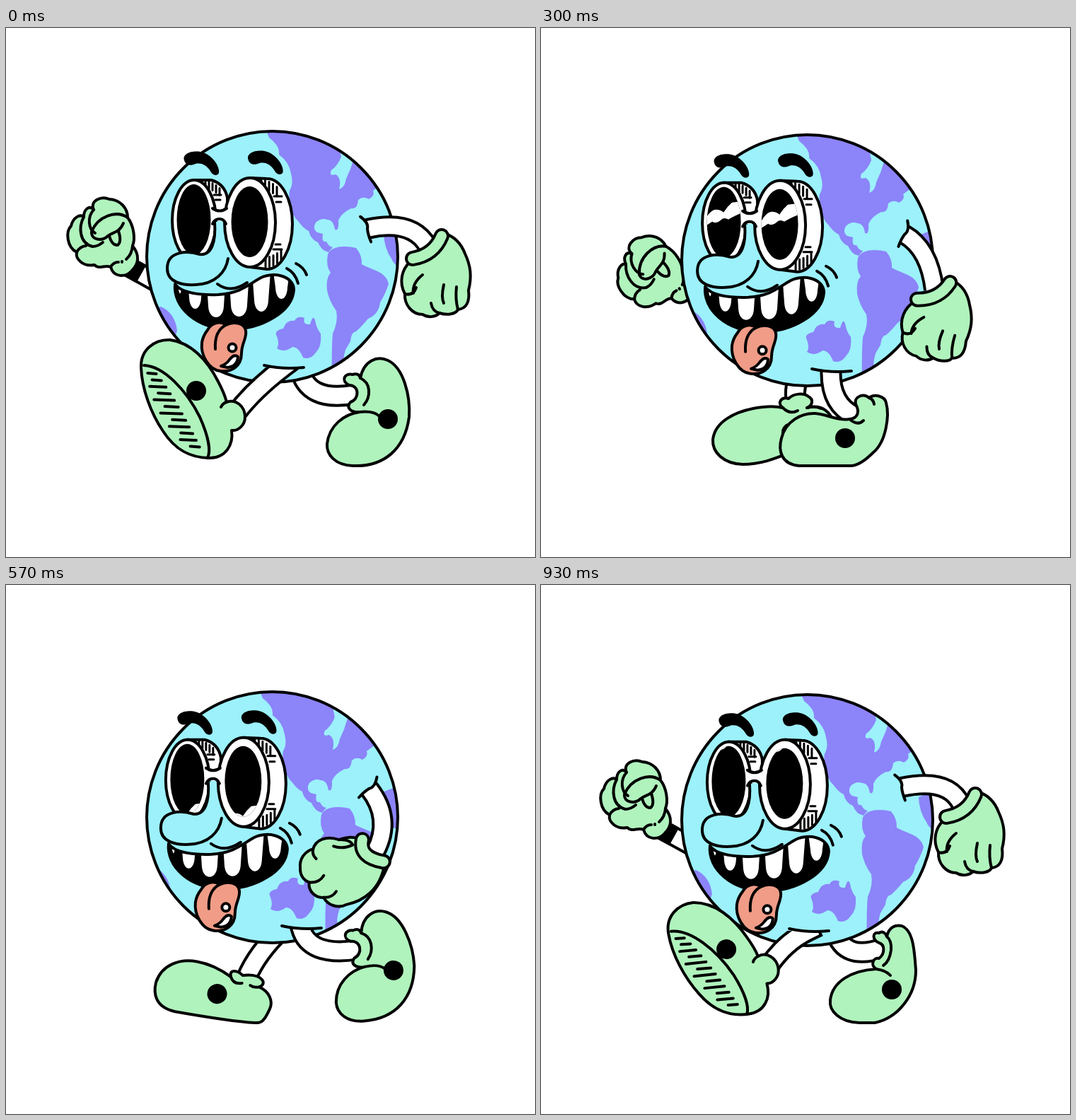
These frames come from a looping animation (748x748 px, 0.96 s). An HTML page with a canvas:

```html
<!DOCTYPE html>
<html lang="en">
<head>
<meta charset="utf-8">
<title>Walking globe</title>
<style>
html, body { margin: 0; width: 100%; height: 100%; overflow: hidden; background: #fff; }
canvas { display: block; width: 748px; height: 748px; }
</style>
</head>
<body>
<canvas id="stage" width="748" height="748"></canvas>
<script>
const ctx = document.getElementById('stage').getContext('2d');
const LOOP = 960, STEP = 30, TAU = Math.PI * 2;
const SEA = '#9cf1fb', LAND = '#8c84f9', GREEN = '#b0f3bd', SKIN = '#f09c87', INK = '#000', WHITE = '#fff';
const CX = 376.5, CY = 323.5, R = 177.5;
const path = d => new Path2D(d);

const land = path(`M366 140 L372 155 Q388 167 386 179 Q401 190 403 206 Q407 220 401 230 Q399 240 404 250
  Q404 265 413 273 Q421 284 428 287 Q431 299 441 303 Q446 315 456 317 L462 310 Q456 309 453 302 Q446 304 448 291
  L440 289 Q433 284 438 275 Q446 268 454 271 Q463 271 465 285 Q471 288 470 272 Q474 262 488 255 Q497 257 498 243
  Q505 237 513 242 Q522 237 519 230 L530 222 L560 150 Z`);
const southLand = path(`M455 320 C460 308 479 307 495 311 Q504 322 503 334 C516 342 538 344 541 362
  Q536 377 529 388 Q527 405 512 411 Q502 423 495 429 Q488 430 487 443 L480 455 Q476 468 478 476 L474 500 L461 500
  Q460 455 462 432 Q470 415 467 400 Q457 386 454 371 Q452 354 459 346 Q452 337 455 320Z`);
const island = path(`M383 436 Q378 428 392 425 Q397 412 408 414 Q412 406 422 410 Q419 420 430 419 Q434 404 437 413
  Q439 425 445 432 Q447 450 438 459 Q430 470 420 466 Q414 451 405 451 Q393 460 383 453 Q387 447 383 436Z`);
const rims = path('M534 291 Q546 286 562 280 V340 Q549 337 545 326 Q535 312 534 291Z M219 394 Q239 403 242 428 L236 446 L195 400Z');
const bay = path('M466 140 L474 182 Q469 195 460 201 Q456 210 466 207 Q475 212 471 228 Q479 226 481 213 Q488 199 492 184 L500 140Z');

const brow = path('M252 187 C249 178 262 173 275 175 C291 178 303 196 301 205 C299 210 292 208 290 204 C285 195 277 190 268 192 C262 195 254 195 252 187Z');
const nose = path('M295 274 C297 302 291 322 274 320 C258 315 228 314 228 340 C228 360 250 364 268 363 C296 362 311 345 314 326');
const noseFill = path('M295 274 C297 302 291 322 274 320 C258 315 228 314 228 340 C228 360 250 364 268 363 C296 362 311 345 314 326 L309 274Z');
const mouth = path('M239 362 C247 374 272 378 300 377 C330 375 342 364 357 355 C376 343 407 350 407 370 C405 401 362 426 318 426 C268 425 236 394 239 362Z');
const tongue = path('M285 427 C291 416 304 414 311 420 C321 415 337 416 339 428 C341 438 333 446 333 460 C333 479 318 487 303 485 C286 483 275 462 277 445 C278 438 281 432 285 427Z');
const glint = path('M-30 18 Q-20 -4 -11 -4 Q-4 -4 0 0 Q5 -8 12 -14 L30 -16 V-1 Q15 5 7 10 Q0 6 -4 11 Q-10 17 -16 13 L-30 22Z');

// Foot drawings: ankle pivot, outline, inner lines, badge centre.
const soleLines = () => {
  let d = 'M195 477 C223 478 255 512 274 550 C286 577 290 598 285 608';
  for (let i = 0; i < 12; i++) {
    const y = 488 + 9.4 * i, u = (y - 480) / 110;
    const left = 191 + 54 * u * u, right = 209 + 69 * u ** 0.8;
    d += ` M${i % 2 ? (left + right) / 2 - 2 : left + 9} ${y} L${right - 5} ${y + 1}`;
  }
  return d;
};
const makeFoot = (px, py, outline, lines, bx, by) => ({ px, py, outline: path(outline), lines: path(lines), bx, by });
const FEET = {
  sole: makeFoot(325, 545, 'M191 480 C190 455 210 440 232 441 C262 445 285 470 300 500 C308 515 311 525 312 529 C325 524 338 535 338 550 C338 562 328 570 319 569 C322 590 310 608 288 608 C262 608 240 598 222 570 C205 545 192 510 191 480Z',
    soleLines() + ' M312 529 Q306 531 304 536', 269, 513),
  flat: makeFoot(383, 555, 'M292 619 C262 618 257 598 258 583 C262 556 286 544 310 544 C330 544 345 549 361 557 C356 546 369 546 377 552 C405 544 414 558 403 564 C418 568 426 580 423 592 C418 612 414 614 406 615 C380 618 340 619 292 619Z',
    'M361 557 Q366 567 378 563 M403 564 Q396 567 390 564', 346, 584),
  bent: makeFoot(443, 548, 'M365 619 C340 617 335 598 340 580 C346 556 368 544 388 545 C404 546 420 556 436 553 C448 552 451 543 445 532 C442 521 456 516 464 523 C471 517 486 520 488 530 C493 548 488 585 470 600 C458 612 448 619 438 619Z',
    'M436 553 Q448 563 456 555 M464 523 Q470 525 471 532', 430, 580),
  push: makeFoot(482, 514, 'M450 619 C422 618 407 602 409 587 C412 560 440 545 474 543 C465 537 470 526 478 528 C487 521 486 508 478 506 C468 501 468 490 478 492 C484 488 488 494 489 497 C492 483 502 480 510 482 C526 488 528 515 530 545 C530 580 505 612 472 619Z',
    'M474 543 Q488 545 494 552 M489 497 Q496 503 495 516 Q493 532 484 538', 496, 572),
  tiptoe: makeFoot(492, 518, 'M500 543 C488 544 480 537 487 529 C500 525 500 505 485 505 C472 498 480 487 490 490 C496 488 500 490 501 495 C506 470 525 463 540 470 C562 480 572 520 570 550 C564 595 535 621 490 619 C466 618 453 604 454 588 C457 562 478 546 500 543Z',
    'M500 543 Q520 541 528 549 M501 495 Q512 500 513 512 Q514 524 506 533', 540, 553),
  trail: makeFoot(492, 514, 'M545 619 C524 618 517 600 521 582 C525 562 538 553 549 549 C530 556 512 547 503 535 C492 538 482 535 485 529 C498 526 498 506 485 500 C479 490 491 486 501 490 C502 476 511 470 522 471 C550 473 585 490 600 505 C616 521 614 560 607 585 C600 605 592 618 580 619Z',
    'M549 549 Q555 546 556 542 M501 490 Q507 493 508 498', 571, 528),
  swing: makeFoot(360, 525, 'M285 617 C258 616 242 600 243 582 C246 556 275 543 300 538 C315 535 330 534 342 537 C333 530 340 521 350 524 C358 516 372 516 378 521 C386 525 384 534 376 537 C398 531 412 545 413 560 C412 578 400 586 385 589 C350 598 325 617 285 617Z',
    'M342 537 Q352 547 363 541 M376 537 Q388 534 396 538', 354, 572)
};
// Walk poses: drawing, ankle x, y, turn, hip x, knee x, y.
const WALK = [
  ['sole', 325, 545, 0, 392, 350, 512], ['flat', 340, 556, 10, 392, 355, 520],
  ['flat', 360, 556, 2, 390, 365, 520], ['flat', 383, 555, 0, 391, 377, 520],
  ['flat', 412, 553, -2, 400, 395, 525], ['bent', 443, 548, 0, 410, 409, 532],
  ['bent', 465, 537, -6, 413, 420, 530], ['push', 482, 514, 0, 416, 428, 532],
  ['tiptoe', 492, 518, 0, 415, 425, 530], ['tiptoe', 496, 516, -7, 417, 428, 526],
  ['trail', 484, 514, 0, 418, 429, 523], ['trail', 492, 514, 0, 418, 430, 520],
  ['swing', 425, 518, -14, 395, 425, 500], ['swing', 360, 525, 0, 371, 357, 500],
  ['swing', 338, 533, 12, 373, 345, 500], ['sole', 322, 539, -8, 378, 345, 505]
];
const BOB = [0, 5, 8, 10, 2, 5, 8, 9];

// Near arm: time, shoulder, elbow, wrist, turn.
const NEAR_ARM = [
  [0, 511, 284, 574, 270, 596, 308, 0], [180, 509, 298, 560, 296, 592, 325, -15],
  [300, 514, 292, 549, 312, 556, 370, 11], [390, 513, 288, 553, 315, 546, 374, 55],
  [480, 511, 284, 546, 320, 525, 370, 60], [690, 517, 294, 552, 340, 532, 387, 54],
  [750, 517, 291, 566, 320, 574, 386, 50], [810, 517, 290, 580, 303, 602, 372, 42],
  [930, 510, 286, 576, 272, 594, 310, 0]
];
// Far arm: time, fist centre, turn.
const FAR_ARM = [
  [0, 130, 295, 0], [90, 118, 283, 5], [180, 133, 288, 0], [300, 150, 351, -25], [360, 190, 425, -55],
  [420, 275, 435, -85], [480, 340, 400, -100], [600, 335, 405, -100], [690, 255, 456, -75],
  [750, 195, 430, -60], [810, 143, 363, -33], [930, 127, 303, 0]
];
const openHand = path('M572 330 C561 340 556 358 565 375 C564 390 575 404 590 404 C598 409 608 408 614 402 C625 406 638 403 640 397 C652 396 657 386 655 370 C660 350 658 335 650 318 C643 300 632 293 622 290Z');
const openLines = path('M565 375 Q577 378 581 366 M590 348 Q575 360 577 374 M614 402 Q604 400 602 388 M620 362 Q616 380 620 388 M640 397 Q636 382 638 365');
const curlHand = path('M502 352 C492 346 480 350 474 352 C455 345 441 352 437 364 C425 367 417 378 418 390 C417 402 424 409 430 411 C428 425 440 434 450 433 C455 444 470 450 482 444 C505 440 530 425 537 390Z');
const curlLines = path('M437 364 Q435 373 441 378 M474 352 Q490 352 493 360 Q478 366 466 361 M430 411 Q444 413 451 402 M450 433 Q462 434 468 425');
const fist = path('M124 257 C118 244 135 237 146 242 C162 243 172 255 172 268 C181 280 183 298 179 308 C190 322 187 334 178 343 C168 354 152 352 148 338 C140 334 132 342 125 335 C108 338 98 326 100 317 C86 310 84 288 92 280 C95 267 105 263 110 267 C110 256 118 250 124 257Z');
const fistLines = path('M110 267 C102 282 104 304 122 309 Q130 309 137 303 M124 257 C114 268 117 285 126 290 M172 268 C156 257 130 266 121 288 C120 300 136 302 144 294 C152 288 160 290 166 276 M146 294 Q150 308 158 307 Q164 302 159 287 M100 317 Q104 309 113 308 M148 338 Q152 331 159 331 M164 330 v1 M170 327 Q178 320 179 308');

function paint(shape, fill) {
  if (fill) { ctx.fillStyle = fill; ctx.fill(shape); }
  ctx.stroke(shape);
}
function disc(x, y, rx, ry, fill, outlined) {
  ctx.beginPath();
  ctx.ellipse(x, y, rx, ry, 0, 0, TAU);
  ctx.fillStyle = fill;
  ctx.fill();
  if (outlined) ctx.stroke();
}
function scoped(draw) { ctx.save(); draw(); ctx.restore(); }
function placed(x, y, turn, px, py, draw) {
  scoped(() => {
    ctx.translate(x, y);
    ctx.rotate(turn * Math.PI / 180);
    ctx.translate(-px, -py);
    draw();
  });
}
function tube(d, width, color, cap = 'butt') {
  const shape = path(d);
  scoped(() => {
    ctx.lineCap = cap;
    for (const [w, c] of [[width, INK], [width - 8, color]]) {
      ctx.lineWidth = w;
      ctx.strokeStyle = c;
      ctx.stroke(shape);
    }
  });
}
// Smooth periodic interpolation of keyed rows [time, ...values].
function track(keys, t) {
  const n = keys.length;
  let i = n - 1;
  while (keys[i][0] > t) i--;
  const row = j => keys[(j + n) % n].map((v, c) => c ? v : v + Math.floor(j / n) * LOOP);
  const [a, b, c, d] = [i - 1, i, i + 1, i + 2].map(row);
  const span = c[0] - b[0], u = (t - b[0]) / span, u2 = u * u, u3 = u2 * u;
  const slope = (p, q, m) => (q[m] - p[m]) / (q[0] - p[0]) * span;
  return b.slice(1).map((v, j) => {
    const m = j + 1;
    return v * (2 * u3 - 3 * u2 + 1) + c[m] * (3 * u2 - 2 * u3)
      + slope(a, c, m) * (u3 - 2 * u2 + u) + slope(b, d, m) * (u3 - u2);
  });
}

function drawLeg(pose, bob, near) {
  const [, x, y, , hip, kx, ky] = pose, top = 480 + bob;
  scoped(() => {
    if (near) { ctx.beginPath(); ctx.rect(0, top, 748, 300); ctx.clip(); }
    tube(`M${hip} ${top} Q${kx} ${ky} ${x} ${y}`, 31, WHITE, 'square');
  });
  if (near) paint(path(`M${hip - 27} ${top - 3} Q${hip} ${top + 3} ${hip + 29} ${top}`));
}
function drawFoot([name, x, y, turn]) {
  const f = FEET[name];
  placed(x, y, turn, f.px, f.py, () => {
    paint(f.outline, GREEN);
    paint(f.lines);
    disc(f.bx, f.by, 14, 14, INK);
  });
}

function drawFarArm(t, bob) {
  const [x, y, turn] = track(FAR_ARM, t), a = turn * Math.PI / 180;
  const cx = x + 42 * Math.cos(a) - 42 * Math.sin(a), cy = y + 42 * Math.sin(a) + 42 * Math.cos(a);
  const ex = 238, ey = 374 + bob, reach = 22 / Math.hypot(ex - cx, ey - cy);
  tube(`M${cx} ${cy} L${ex} ${ey}`, 29, WHITE);
  tube(`M${cx} ${cy} l${(ex - cx) * reach} ${(ey - cy) * reach}`, 29, INK);
  placed(x, y, turn, 130, 295, () => { paint(fist, GREEN); paint(fistLines); });
}
function drawNearArm(t) {
  const [sx, sy, ex, ey, wx, wy, turn] = track(NEAR_ARM, t);
  const curled = t >= 390 && t < 750;
  const hand = () => { paint(curled ? curlHand : openHand, GREEN); paint(curled ? curlLines : openLines); };
  const cuff = () => tube(curled ? 'M507 353 Q501 378 536 385' : 'M576 325 Q606 320 617 293', 22, GREEN, 'round');
  const spin = curled ? turn - 60 : turn, px = curled ? 525 : 597, py = curled ? 370 : 307;
  placed(wx, wy, spin, px, py, hand);
  tube(`M${sx} ${sy} Q${ex} ${ey} ${wx} ${wy}`, 30, WHITE);
  placed(wx, wy, spin, px, py, cuff);
  placed(sx, sy, Math.atan2(ey - sy, ex - sx) * 180 / Math.PI, 0, 0, () => paint(path('M-6 -19 Q4 -8 0 0 Q-1 8 1 19')));
}

function drawGlobe(bob, shift) {
  scoped(() => {
    ctx.translate(0, bob);
    disc(CX, CY, R, R, SEA);
    scoped(() => {
      ctx.clip();
      ctx.translate(shift, 0);
      ctx.fillStyle = LAND;
      for (const piece of [land, southLand, island, rims]) ctx.fill(piece);
      ctx.fillStyle = SEA;
      ctx.fill(bay);
    });
    ctx.beginPath();
    ctx.arc(CX, CY, R, 0, TAU);
    ctx.stroke();
  });
}

function drawLens(x, y, rx, ry, px, glintY) {
  disc(x, y, rx, ry, WHITE, true);
  scoped(() => {
    disc(x - 0.5, y - 1, px, 50, INK);
    ctx.clip();
    ctx.translate(x - 1, y + glintY);
    ctx.fillStyle = WHITE;
    ctx.fill(glint);
  });
}
function drawGlasses(glintY) {
  paint(path('M265 215 L290 215 Q309 220 313 240 V262 H280Z'), WHITE);
  paint(path('M345 212 L369 213 A36 64 0 0 1 369 341 L345 338Z'), WHITE);
  let marks = 'M294 236 h10 M296 243 h7 M379 238 h11 M382 246 h7 M378 313 h12 M381 306 h7';
  for (let i = 0; i < 5; i++) {
    const drop = i * i * 0.6;
    marks += ` M${282 + 5 * i} ${217 + drop} v10 M${361 + 5.5 * i} ${215 + drop} v13 M${367 + 5.5 * i} ${338 - drop} v-14`;
  }
  scoped(() => { ctx.lineWidth = 3; paint(path(marks)); });
  drawLens(266, 272, 31, 57, 24, glintY);
  ctx.fillStyle = SEA;
  ctx.fill(noseFill);
  ctx.stroke(nose);
  drawLens(345, 275, 36, 63, 26, glintY);
  ctx.fillStyle = WHITE;
  ctx.fillRect(293, 257, 20, 16);
  paint(path('M292 255 Q302 262 312 255 M292 277 Q295 270 302 270 Q308 270 311 277'));
}
function drawMouth() {
  scoped(() => {
    ctx.fillStyle = INK;
    ctx.fill(mouth);
    ctx.clip(mouth);
    const edges = [238, 254, 281, 313, 346, 376, 403], ends = [378, 399, 411, 410, 403, 385];
    ends.forEach((end, i) => {
      const a = edges[i], b = edges[i + 1], side = end - 18, low = end + 6;
      paint(path(`M${a} 345 L${a + 3} ${side} C${a + 4} ${low} ${b - 4} ${low} ${b - 3} ${side} L${b} 345`), WHITE);
    });
  });
  ctx.stroke(mouth);
  paint(tongue, SKIN);
  paint(path('M311 420 C299 426 295 438 296 454'));
  disc(320, 452, 5.5, 5.5, WHITE, true);
  paint(path('M304 478 Q312 475 316 469 Q323 460 328 465 Q327 479 313 480Z'), WHITE);
}
function drawFace(t, bob, shift) {
  scoped(() => {
    ctx.translate(shift, bob * 0.75);
    ctx.fillStyle = INK;
    ctx.fill(brow);
    placed(90.5, -1, 0, 0, 0, () => ctx.fill(brow));
    drawMouth();
    drawGlasses(21 - 0.3 * (t % 480 - 180));
    paint(path('M299 362 Q318 376 341 360 M397 340 Q409 346 413 361 M410 333 Q421 338 425 349'));
  });
}

function render(t) {
  const beat = Math.floor(t / 60), near = WALK[beat], far = WALK[(beat + 8) % 16];
  const bob = BOB[beat % 8], shift = 5 * (Math.cos(TAU * t / LOOP) - 1);
  ctx.fillStyle = WHITE;
  ctx.fillRect(0, 0, 748, 748);
  ctx.strokeStyle = INK;
  ctx.lineWidth = 4;
  ctx.lineJoin = ctx.lineCap = 'round';
  drawFarArm(t, bob);
  drawLeg(far, bob, false);
  drawGlobe(bob, shift);
  drawFace(t, bob, shift);
  drawFoot(far);
  drawLeg(near, bob, true);
  drawFoot(near);
  drawNearArm(t);
}

const start = performance.now();
function tick() {
  const t = (performance.now() - start) % LOOP;
  render(Math.floor(t / STEP) * STEP);
  requestAnimationFrame(tick);
}
tick();
</script>
</body>
</html>
```
